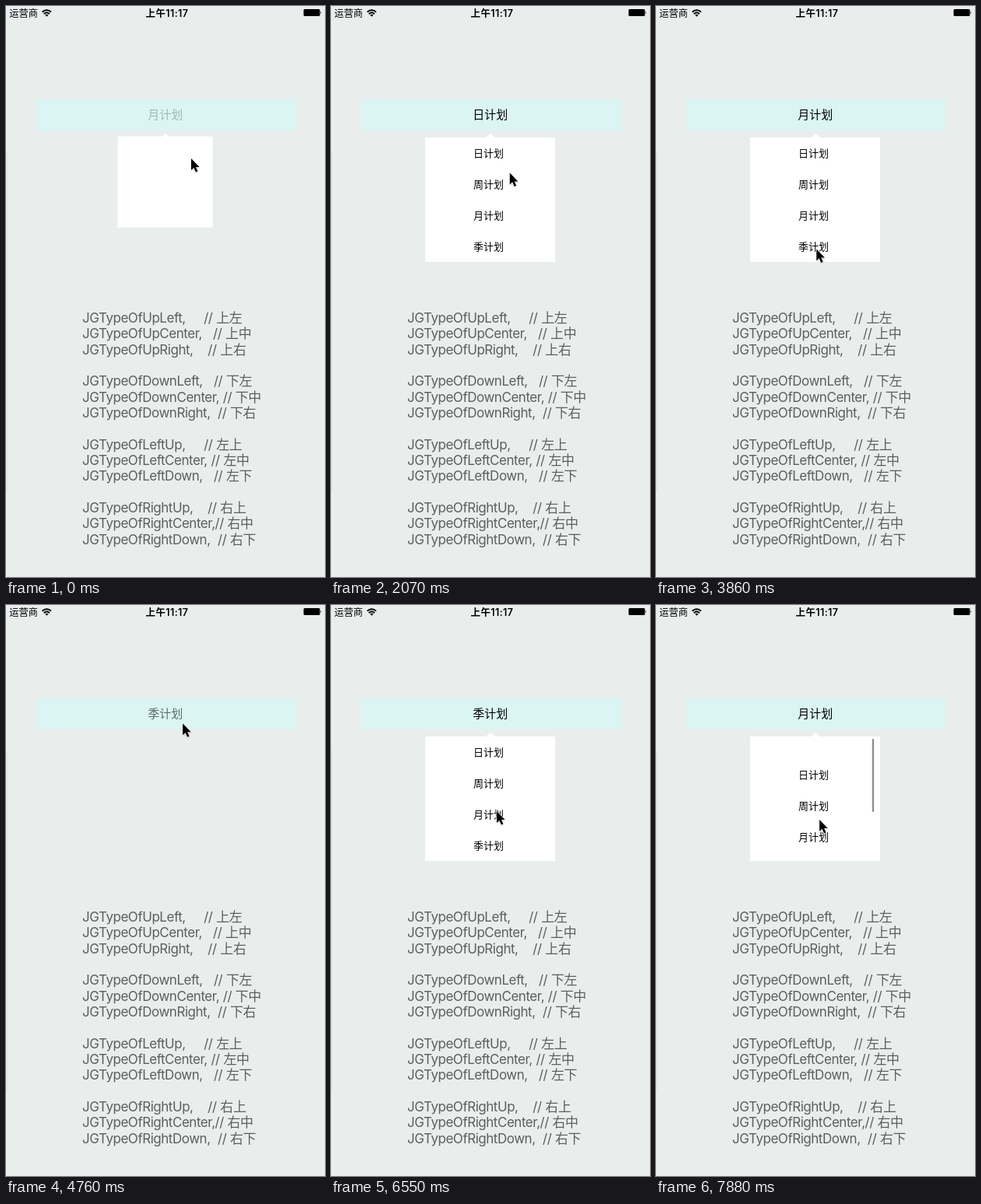
These frames come from a looping animation (410 by 734 pixels, 8000 ms). An HTML page:

```html
<!DOCTYPE html>
<html lang="zh-CN">
<head>
<meta charset="utf-8">
<style>
html, body { margin: 0; width: 100%; height: 100%; overflow: hidden; background: #e9eeed; }
svg { display: block; width: 410px; height: 734px; }
text { font-family: Inter, "Noto Sans CJK SC", "Noto Sans CJK", sans-serif; white-space: pre; }
.code { font-size: 17px; letter-spacing: -.47px; word-spacing: .4px; fill: #5c5f5e; }
.item { font-size: 13px; }
</style>
</head>
<body>
<svg viewBox="0 0 410 734" xmlns="http://www.w3.org/2000/svg">
  <defs>
    <radialGradient id="shine">
      <stop offset="0" stop-color="#fff" stop-opacity=".95"/>
      <stop offset=".28" stop-color="#fff" stop-opacity=".8"/>
      <stop offset=".6" stop-color="#fff" stop-opacity=".25"/>
      <stop offset="1" stop-color="#fff" stop-opacity="0"/>
    </radialGradient>
    <clipPath id="list"><rect x="121" y="169" width="167" height="160"/></clipPath>
    <filter id="soft" x="-50%" y="-50%" width="200%" height="200%"><feGaussianBlur stdDeviation="1"/></filter>
  </defs>
  <rect width="410" height="734" fill="#e9eeed"/>
  <rect y="188" width="2" height="436" fill="#e2e7e6"/>

  <text x="4.3" y="14" font-size="12.2">运营商</text>
  <g fill="none" stroke="#000" stroke-width="1.9">
    <path d="M46.6 7.8Q52.3 2.8 58 7.8"/>
    <path d="M48.7 10.2Q52.3 7 55.9 10.2"/>
  </g>
  <path d="M50.2 11.6Q52.3 10 54.4 11.6L52.3 13.8Z"/>
  <text x="207" y="14" font-size="12.5" font-weight="600" letter-spacing=".4" text-anchor="middle">上午11:17</text>
  <rect x="382.5" y="4" width="21" height="9" rx="1.5"/>
  <path d="M404.4 7Q406.2 8.5 404.4 10Z"/>

  <rect x="37.5" y="119.6" width="335" height="40" fill="#daf5f4"/>
  <circle id="glow" cx="205" cy="140" r="50" fill="url(#shine)"/>
  <text id="title" x="204.7" y="145" font-size="15" text-anchor="middle"></text>

  <g id="lines"></g>

  <path id="popup" fill="#fff" d="M-84 5H-6L0 0L6 5H83V165H-84Z"/>
  <g id="items" clip-path="url(#list)"><g id="rows"></g></g>
  <rect id="bar" x="277.8" y="172" width="2.4" height="94" rx="1.2" fill="#8f8f8f"/>

  <g id="cursor">
    <path d="M0 1V16L3.4 12.8L6 18.5L8.6 17.3L6.1 11.8H11Z" opacity=".35" filter="url(#soft)"/>
    <path d="M0 0V15L3.4 11.9L5.9 17.6L8.4 16.5L6 11H10.6Z" stroke="#fff" stroke-width="1.2" paint-order="stroke"/>
  </g>
</svg>
<script>
const LOOP = 8000, STEP = 148.65, SPEED = .44;
const $ = id => document.getElementById(id);
const [DAY, WEEK, MONTH, SEASON] = ['日计划', '周计划', '月计划', '季计划'];

const code = `JGTypeOfUpLeft,     // 上左
JGTypeOfUpCenter,   // 上中
JGTypeOfUpRight,    // 上右

JGTypeOfDownLeft,   // 下左
JGTypeOfDownCenter, // 下中
JGTypeOfDownRight,  // 下右

JGTypeOfLeftUp,     // 左上
JGTypeOfLeftCenter, // 左中
JGTypeOfLeftDown,   // 左下

JGTypeOfRightUp,    // 右上
JGTypeOfRightCenter,// 右中
JGTypeOfRightDown,  // 右下`;

function addText(parent, cls, x, y, str) {
  const el = document.createElementNS('http://www.w3.org/2000/svg', 'text');
  el.setAttribute('class', cls);
  el.setAttribute('x', x);
  el.setAttribute('y', y);
  el.textContent = str;
  parent.append(el);
}
code.split('\n').forEach((s, i) => addText($('lines'), 'code', 98, 407 + i * 20.33, s));
[DAY, WEEK, MONTH, SEASON].forEach((s, i) => addText($('rows'), 'item', 183, 194 + i * 40, s));

const clamp = v => Math.min(1, Math.max(0, v));
const smooth = v => (v = clamp(v), v * v * (3 - 2 * v));
const easeOut = v => 1 - (1 - clamp(v)) ** 3;
const mix = (a, b, k) => a.map((v, i) => v + (b[i] - v) * k);

// Picking a row closes the list; the next press on the button opens it again
const cycles = [
  { close: 0, press: 10, from: MONTH, to: DAY, pick: [238, 196], button: [250, 145] },
  { close: 18, press: 21, from: DAY, to: MONTH, pick: [215, 265], button: [223, 148] },
  { close: 30, press: 35, from: MONTH, to: SEASON, pick: [206, 315], button: [228, 146] },
  { close: 45, press: 48, from: SEASON, to: MONTH, pick: [213, 265], button: [217, 146] }
];
const dragStart = 53, dragPoint = [210, 278];

function poseAt(n) {
  const i = cycles.findLastIndex(c => c.close <= n), c = cycles[i];
  const shut = n - c.close, open = n - c.press;
  const next = cycles[i + 1]?.pick ?? dragPoint;
  const pressed = open >= 0;
  return {
    title: shut ? c.to : c.from,
    scale: smooth(pressed ? .05 + SPEED * open : .66 - SPEED * shut),
    ink: clamp(pressed ? .25 + .3 * open : shut ? .06 + .5 * (shut - 1) : .25),
    glow: pressed ? clamp(1 - .55 * open) : 0,
    cursor: open > 2
      ? mix(c.button, next, easeOut((open - 2) / 4))
      : mix(c.pick, c.button, easeOut(shut / 3))
  };
}

function draw(t) {
  const n = Math.floor((t + 8) / STEP);
  const { title, scale, ink, glow, cursor } = poseAt(n);
  const scroll = n >= dragStart ? 29 : 0;
  $('title').textContent = title;
  $('title').setAttribute('opacity', ink);
  $('glow').setAttribute('opacity', glow);
  $('popup').setAttribute('transform', `translate(205 164) scale(${scale})`);
  $('items').setAttribute('opacity', scale === 1 ? 1 : 0);
  $('rows').setAttribute('transform', `translate(0 ${scroll})`);
  $('bar').setAttribute('opacity', scroll ? 1 : 0);
  $('cursor').setAttribute('transform', `translate(${cursor})`);
}

let start;
function tick(now) {
  start ??= now;
  draw((now - start) % LOOP);
  requestAnimationFrame(tick);
}
draw(0);
requestAnimationFrame(tick);
</script>
</body>
</html>
```
